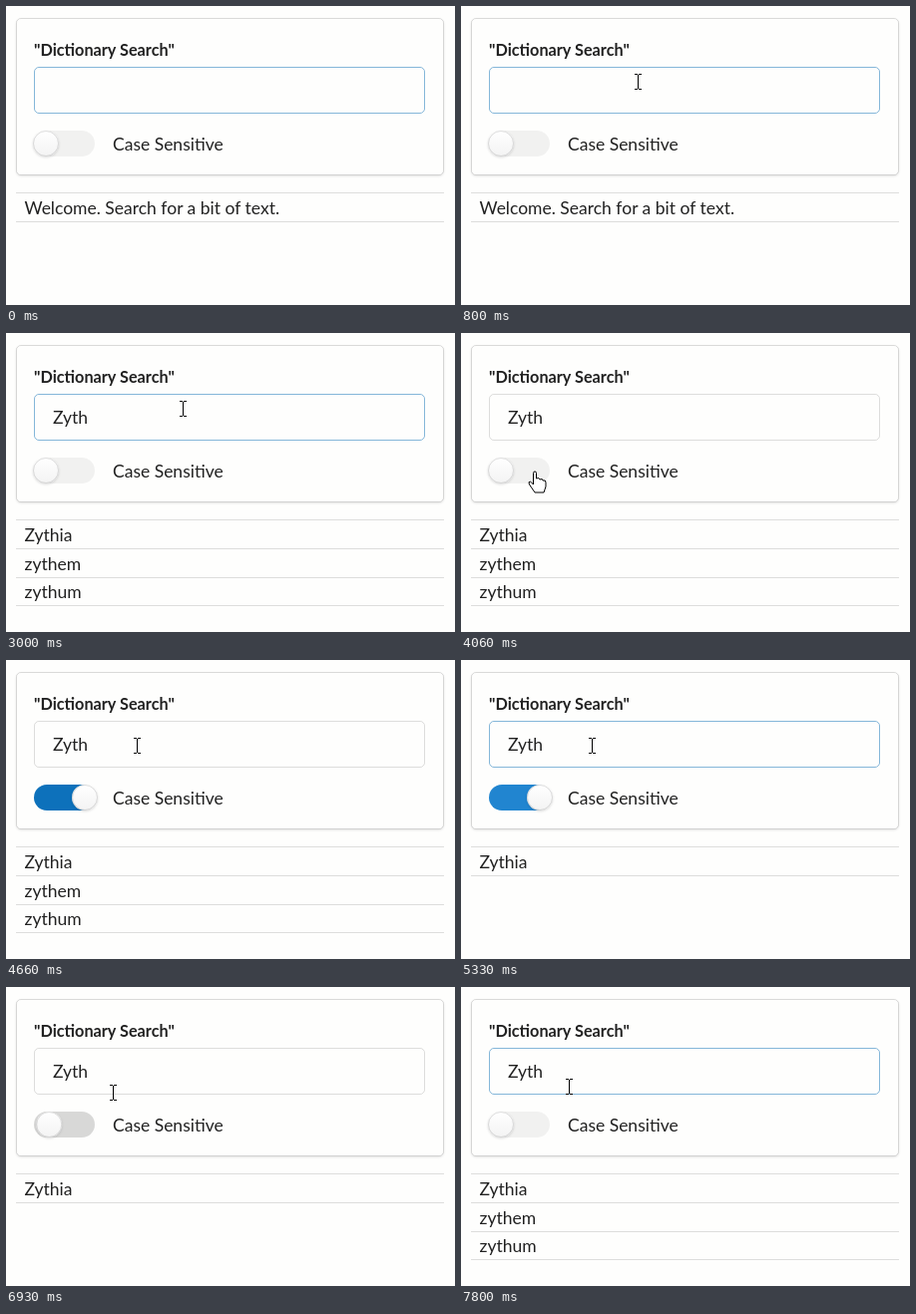
These frames come from a looping animation (450x300 px, 8 s). An HTML page:

```html
<!DOCTYPE html>
<html lang="en">
<head>
<meta charset="utf-8">
<title>Dictionary Search</title>
<style>
  html, body { margin: 0; width: 100%; height: 100%; overflow: hidden; background: #fefefd; }
  svg { display: block; width: 450px; height: 300px; }
  text { font: 17.5px Lato, sans-serif; fill: rgba(0, 0, 0, .87); }
  .label { font-weight: 700; font-size: 16.25px; }
  .card, .field { fill: none; stroke: #222426; stroke-opacity: .15; }
  .card { fill: #fefefd; filter: drop-shadow(0 1px 1px rgba(34, 36, 38, .15)); }
  .field.focus { stroke: #85b7d9; stroke-opacity: 1; }
  .line { stroke: #222426; stroke-opacity: .15; }
  .knob { filter: drop-shadow(0 1px 1px rgba(34, 36, 38, .15)); }
  .ring { fill: none; stroke: #222426; stroke-opacity: .15; }
</style>
</head>
<body>
<svg viewBox="0 0 450 300">
  <defs>
    <linearGradient id="shade" x2="0" y2="1">
      <stop stop-color="#fff"/><stop offset="1" stop-color="#f3f3f3"/>
    </linearGradient>
  </defs>
  <rect class="card" x="10.5" y="12.5" width="428" height="157" rx="4.5"/>
  <text class="label" x="28" y="50">"Dictionary Search"</text>
  <rect class="field" id="field" x="28.5" y="61.5" width="391" height="46" rx="4.5"/>
  <text id="query" x="47" y="91"></text>
  <rect id="caret" y="74" width="1" height="21"/>
  <rect id="track" x="28" y="125" width="61" height="26" rx="13"/>
  <g id="knob">
    <circle class="knob" r="13" fill="url(#shade)"/>
    <circle class="ring" r="12.5"/>
  </g>
  <text x="107" y="145">Case Sensitive</text>
  <path class="line" d="M10 187.5H439"/>
  <g id="rows"></g>
  <g id="pointer">
    <path id="beam" d="M-3 -7.5H0M1 -7.5H4M.5 -7V7M-3 7.5H0M1 7.5H4" fill="none" stroke="#000"/>
    <path id="arrow" d="M.5 .5V16.5L4.2 13L6.7 18.5L9 17.5L6.6 12H11.7Z" fill="#fff" stroke="#000"/>
    <path id="hand" d="M-1.5 10V1.5Q-1.5 0 0 0T1.5 1.5V7Q4.5 5.5 5 8Q8 6.5 8 9Q11 8 11 11V15L9 21H0L-5.5 13Q-7 10 -4.5 10L-1.5 13Z" fill="#fff" stroke="#000"/>
  </g>
</svg>
<script>
const LOOP = 8000, FRAME = 200 / 3;
const $ = id => document.getElementById(id);

const pointerPath = [
  [60, 434, 150], [600, 177, 76], [3400, 177, 76], [3930, 74, 139], [4260, 74, 139],
  [4600, 131, 86], [6000, 131, 86], [6260, 98, 143], [6400, 74, 140], [6700, 74, 140],
  [6930, 107, 106], [7060, 108, 100]
];
const caretOn = [[270, 800], [1330, 1860], [2260, 3000], [3530, 4000], [4800, 5330], [5800, 6390], [7200, 7700]];
const inputBlurred = [[4000, 4800], [6600, 7200]];
const toggleFocused = [[4200, 4800], [6730, 7200]];
const typing = [[0, ""], [2260, "Z"], [2400, "Zy"], [2460, "Zyt"], [2530, "Zyth"]];
const matches = ["Zythia", "zythem", "zythum"];
const results = [[0, ["Welcome. Search for a bit of text."]], [3000, matches], [5260, matches.slice(0, 1)], [7660, matches]];
const checkTime = 4200, uncheckTime = 6740;

const within = (spans, t) => spans.some(([a, b]) => t >= a && t < b);
const latest = (steps, t) => steps.findLast(([start]) => t >= start)[1];
const clamp = p => Math.min(1, Math.max(0, p));
const smooth = p => p * p * (3 - 2 * p);
const slide = (t, start) => 1 - (1 - clamp((t - start) / 300)) ** 2.4;
const show = (id, visible) => $(id).setAttribute("visibility", visible ? "visible" : "hidden");

function pointerAt(t) {
  const next = pointerPath.findIndex(([time]) => time > t);
  if (next < 1) return pointerPath.at(next).slice(1);
  const [t0, x0, y0] = pointerPath[next - 1], [t1, x1, y1] = pointerPath[next];
  const p = smooth((t - t0) / (t1 - t0));
  return [x0 + (x1 - x0) * p, y0 + (y1 - y0) * p];
}

function drawPointer(t) {
  const [x, y] = pointerAt(t).map(Math.round);
  const inField = x > 28 && x < 420 && y > 61 && y < 108;
  const onToggle = x > 28 && x < 90 && y > 125 && y < 151;
  $("pointer").setAttribute("transform", `translate(${x} ${y})`);
  show("beam", t >= 60 && inField);
  show("hand", t >= 60 && onToggle);
  show("arrow", t >= 60 && !inField && !onToggle);
}

function drawToggle(t) {
  const checked = t >= checkTime && t < uncheckTime;
  const focused = within(toggleFocused, t);
  $("track").setAttribute("fill", checked
    ? (focused ? "#0d71bb" : "#2185d0")
    : `rgba(0, 0, 0, ${focused ? .15 : .05})`);
  const x = 40 + 39 * (slide(t, checkTime) - slide(t, uncheckTime));
  $("knob").setAttribute("transform", `translate(${x} 138)`);
}

let shownRows;
function drawRows(rows) {
  if (rows === shownRows) return;
  shownRows = rows;
  $("rows").innerHTML = rows.map((word, i) => {
    const top = Math.round(i * 28.5);
    return `<text x="18.5" y="${209 + top}">${word}</text>
      <path class="line" d="M10 ${216.5 + top}H439"/>`;
  }).join("");
}

function draw(now) {
  // Advance in steps of 1/15 s, like a screen recording.
  const t = Math.floor((now % LOOP + 7) / FRAME) * FRAME % LOOP;
  const text = latest(typing, t);
  $("query").textContent = text;
  $("caret").setAttribute("x", text ? Math.round(47 + $("query").getComputedTextLength()) : 47);
  show("caret", within(caretOn, t));
  $("field").classList.toggle("focus", !within(inputBlurred, t));
  drawToggle(t);
  drawRows(latest(results, t));
  drawPointer(t);
}

const start = performance.now();
function tick() {
  draw(performance.now() - start);
  requestAnimationFrame(tick);
}
tick();
</script>
</body>
</html>
```
